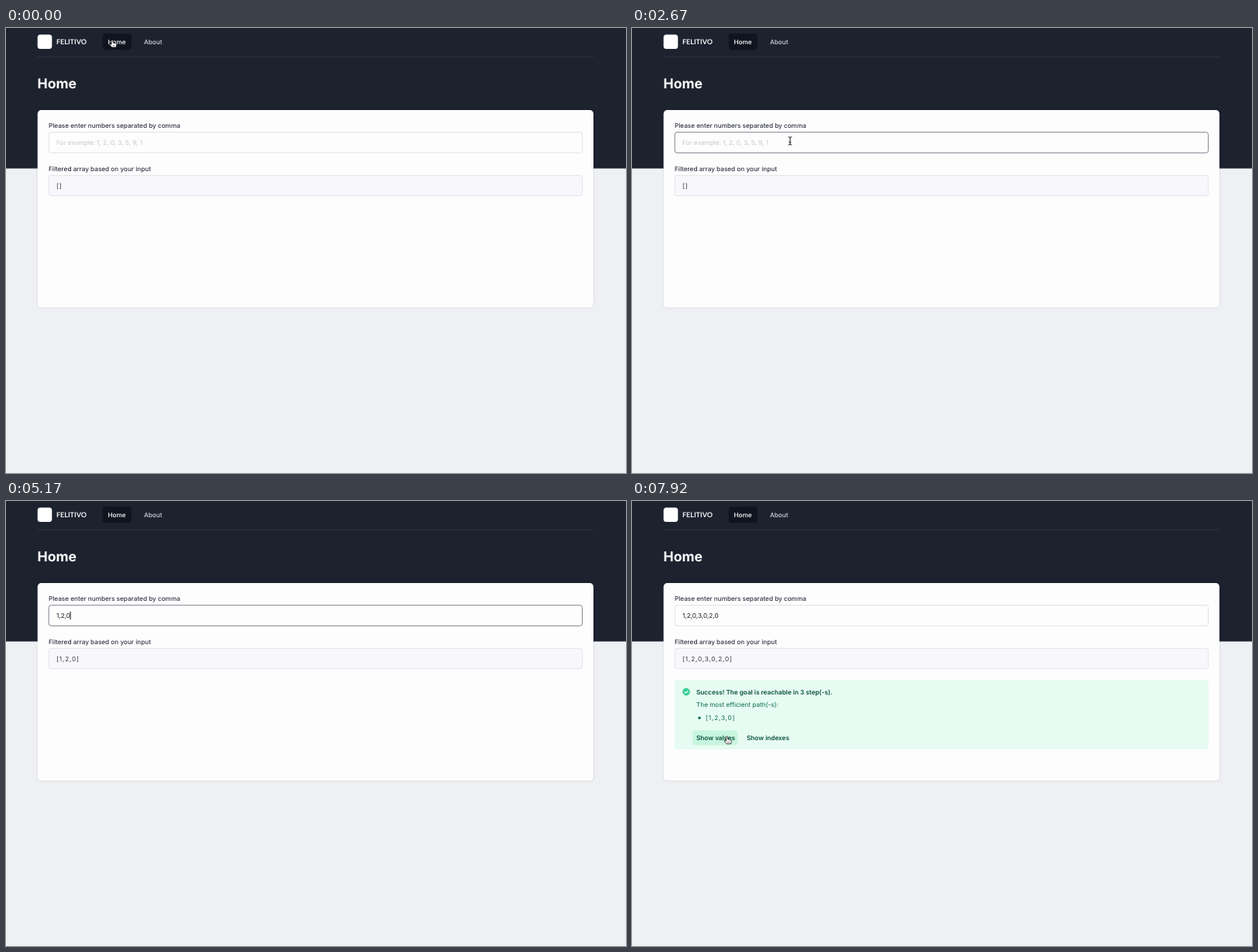
An HTML page that plays this animation: 800 by 575 pixels, repeating every 8 s.

```html
<!DOCTYPE html>
<html lang="en">
<head>
<meta charset="utf-8">
<title>Home</title>
<style>
html, body { margin: 0; width: 100%; height: 100%; overflow: hidden; background: #eff0f3; }
svg { display: block; width: 100%; height: 100%; }
text { font: 400 8.2px Inter, "Liberation Sans", sans-serif; text-rendering: geometricPrecision; white-space: pre; fill: #2f3542; }
.mid { font-weight: 500; }
.bold { font-weight: 600; }
.title { font-size: 17.6px; font-weight: 700; fill: #fff; }
.brand { font: 700 9px Lato, sans-serif; fill: #f4f5f7; }
.hint { fill: #c3c5cb; }
.code { letter-spacing: .1em; }
.ok text { fill: #0b6b50; }
.ok .bold { fill: #0a523f; }
.card { filter: drop-shadow(0 .6px 1px rgba(0, 0, 0, .16)); }
.hide { display: none; }
</style>
</head>
<body>
<svg viewBox="0 0 800 575">
  <rect width="800" height="575" fill="#eff0f3"/>
  <rect width="800" height="181.5" fill="#1c222e"/>
  <path d="M41 37.2H758" stroke="#333945" stroke-width=".8"/>
  <rect x="40.7" y="8.5" width="18.6" height="18.6" rx="3.6" fill="#fff"/>
  <text class="brand" x="65" y="20.8">FELITIVO</text>
  <rect id="tab" x="124.7" y="7.2" width="37" height="21" rx="3.6" fill="#0f141f"/>
  <text id="navHome" class="mid" x="131.4" y="20.6">Home</text>
  <text id="navAbout" class="mid" x="178" y="20.6">About</text>
  <text id="title" class="title" x="40.5" y="78.3">Home</text>
  <rect id="card" class="card" x="40.7" y="106" width="717.3" height="255.3" rx="4.7" fill="#fefdfe"/>

  <g id="form">
    <text class="mid" x="55" y="129">Please enter numbers separated by comma</text>
    <rect id="field" x="55.2" y="134.7" width="688.4" height="26.6" rx="3" fill="#fefdfe" stroke-width=".9"/>
    <rect id="mark" x="65" y="142.6" height="10.6" fill="#a6d0fb"/>
    <text id="hint" class="hint" x="65" y="151.3">For example: 1, 2, 0, 3, 5, 9, 1</text>
    <text id="value" x="65" y="150.9" style="fill:#14171e"></text>
    <rect id="caret" y="142.8" width="1" height="10.4" fill="#14171e"/>
    <text class="mid" x="55" y="184.7">Filtered array based on your input</text>
    <rect x="55.2" y="190.4" width="688.4" height="26.3" rx="3" fill="#f8f7fb" stroke="#e1e1e7" stroke-width=".9"/>
    <text id="list" class="code" x="65" y="206.5">[]</text>
  </g>

  <g id="loading">
    <circle cx="399.4" cy="254.8" r="8" fill="none" stroke="#c9c9cc" stroke-width="3.2"/>
    <path id="arc" d="M407.4 254.8A8 8 0 0 1 399.4 262.8" fill="none" stroke="#484c56" stroke-width="3.2"/>
    <text x="382.7" y="283">Loading...</text>
  </g>

  <g id="alert" class="ok">
    <rect x="54.8" y="231.5" width="689.2" height="89.5" rx="2" fill="#e6fbf2"/>
    <circle cx="70" cy="246.6" r="4.8" fill="#36cf97"/>
    <path d="M67.9 246.8l1.4 1.4 2.9-2.9" fill="none" stroke="#fff" stroke-width="1.2" stroke-linecap="round" stroke-linejoin="round"/>
    <text class="bold" x="83" y="249.5">Success! The goal is reachable in 3 step(-s).</text>
    <text x="83" y="266.3">The most efficient path(-s):</text>
    <circle cx="87" cy="280.2" r="1.7" fill="#0b6b50"/>
    <text class="code" x="95" y="283">[1,2,3,0]</text>
    <rect id="hover" x="78.2" y="296.6" width="58" height="18.8" rx="3.4" fill="#c8f5df"/>
    <text class="bold" x="83" y="309">Show values</text>
    <text class="bold" x="148" y="309">Show indexes</text>
  </g>

  <g id="arrow">
    <path d="M0 0V9.2L2.1 7.3 3.5 10.5 5.1 9.8 3.8 6.7H6.6Z" fill="#0b0c0f" stroke="#fff" stroke-width=".8" stroke-linejoin="round"/>
  </g>
  <g id="hand">
    <path d="M-1 .8Q0-.4 1 .8V4L4.6 4.8Q6 5.2 5.8 6.6L5 10H-.4L-3.4 6.6Q-3.6 5.2-2.2 5.6L-1 6.5Z" fill="#fff" stroke="#111" stroke-width=".8" stroke-linejoin="round"/>
    <path d="M1.2 6.8V8.6M2.8 6.8V8.6" stroke="#111" stroke-width=".5"/>
  </g>
  <g id="beam" fill="none" stroke-linecap="round">
    <path id="bar" d="M-2-5.2Q0-5.2 0-4V4Q0 5.2-2 5.2M2-5.2Q0-5.2 0-4M0 4Q0 5.2 2 5.2M-1 1.5H1" stroke="#fff" stroke-width="1.9"/>
    <use href="#bar" style="stroke:#111"/>
    <path d="M-2-5.2Q0-5.2 0-4V4Q0 5.2-2 5.2M2-5.2Q0-5.2 0-4M0 4Q0 5.2 2 5.2M-1 1.5H1" stroke="#15171c" stroke-width="1"/>
  </g>
</svg>
<script>
const LOOP = 8000;
const NUMBERS = '1,2,0,3,0,2,0';
const LETTERS = 'asdkfjlaskdfj'.repeat(4);
const $ = id => document.getElementById(id);
const show = (id, on) => $(id).classList.toggle('hide', !on);
const within = (t, a, b) => t >= a && t < b;
const attr = (id, name, v) => $(id).setAttribute(name, v);

// time, x, y of the pointer's hot spot
const PATH = [
  [80, 137, 15], [330, 188, 16], [700, 190, 18], [980, 140, 17], [1120, 138, 17],
  [1330, 128, 21], [1500, 128, 21], [1670, 98, 62], [1920, 183, 147], [2170, 183, 147],
  [2420, 204, 145.8], [6500, 204, 151], [6670, 204, 154.5], [6950, 214, 338],
  [7100, 214, 340], [7420, 243, 262], [7840, 122.5, 303.8]
];
// time from which each pointer shape is used
const SHAPES = [
  [0, 'hand'], [1240, 'arrow'], [1840, 'beam'], [3000, ''],
  [6570, 'beam'], [6740, 'arrow'], [7740, 'hand']
];

function pointerAt(t) {
  const i = PATH.findIndex(k => k[0] > t);
  if (i === 0) return PATH[0].slice(1);
  if (i < 0) return PATH[PATH.length - 1].slice(1);
  const [t0, x0, y0] = PATH[i - 1], [t1, x1, y1] = PATH[i];
  const u = (t - t0) / (t1 - t0), e = u * u * (3 - 2 * u);
  return [x0 + (x1 - x0) * e, y0 + (y1 - y0) * e];
}

function typed(text, t, start, end) {
  const u = Math.min(1, (t - start) / (end - start));
  return text.slice(0, Math.max(1, Math.ceil(u * text.length)));
}

function valueAt(t) {
  if (within(t, 3000, 4080)) return typed(LETTERS, t, 3000, 3750);
  if (t >= 4920) return typed(NUMBERS, t, 4920, 5580);
  return '';
}

function drawPage(about) {
  attr('tab', 'x', about ? 171.3 : 124.7);
  $('navHome').style.fill = about ? '#d3d6dc' : '#fff';
  $('navAbout').style.fill = about ? '#fff' : '#d3d6dc';
  $('title').textContent = about ? 'About' : 'Home';
  attr('card', 'height', about ? 269 : 255.3);
  show('form', !about);
}

function drawField(t) {
  const value = valueAt(t);
  const focus = within(t, 2340, 7080);
  const marked = within(t, 3830, 4080) || within(t, 5750, 7080);
  const blink = within(t, 2670, 3000) || within(t, 4580, 4920);
  $('value').textContent = value;
  const width = value ? $('value').getComputedTextLength() : 0;
  attr('field', 'stroke', focus ? '#717783' : '#dedee4');
  attr('mark', 'width', width);
  attr('caret', 'x', 64.6 + width);
  show('mark', marked);
  show('caret', focus && !marked && !blink);
  show('hint', !value);
  $('list').textContent = '[' + value.replace(/[a-z]/g, '').replace(/,$/, '') + ']';
}

function drawPointer(t) {
  const [x, y] = pointerAt(t);
  const shape = SHAPES.filter(s => s[0] <= t).pop()[1];
  for (const id of ['arrow', 'hand', 'beam']) {
    show(id, id === shape);
    attr(id, 'transform', `translate(${x} ${y})`);
  }
}

function frame() {
  const t = performance.now() % LOOP;
  drawPage(within(t, 420, 1080));
  drawField(t);
  show('loading', within(t, 5420, 6330));
  attr('arc', 'transform', `rotate(${165 + (t - 5920) * .36} 399.4 254.8)`);
  show('alert', t >= 6330);
  show('hover', t >= 7740);
  drawPointer(t);
  requestAnimationFrame(frame);
}
frame();
</script>
</body>
</html>
```
